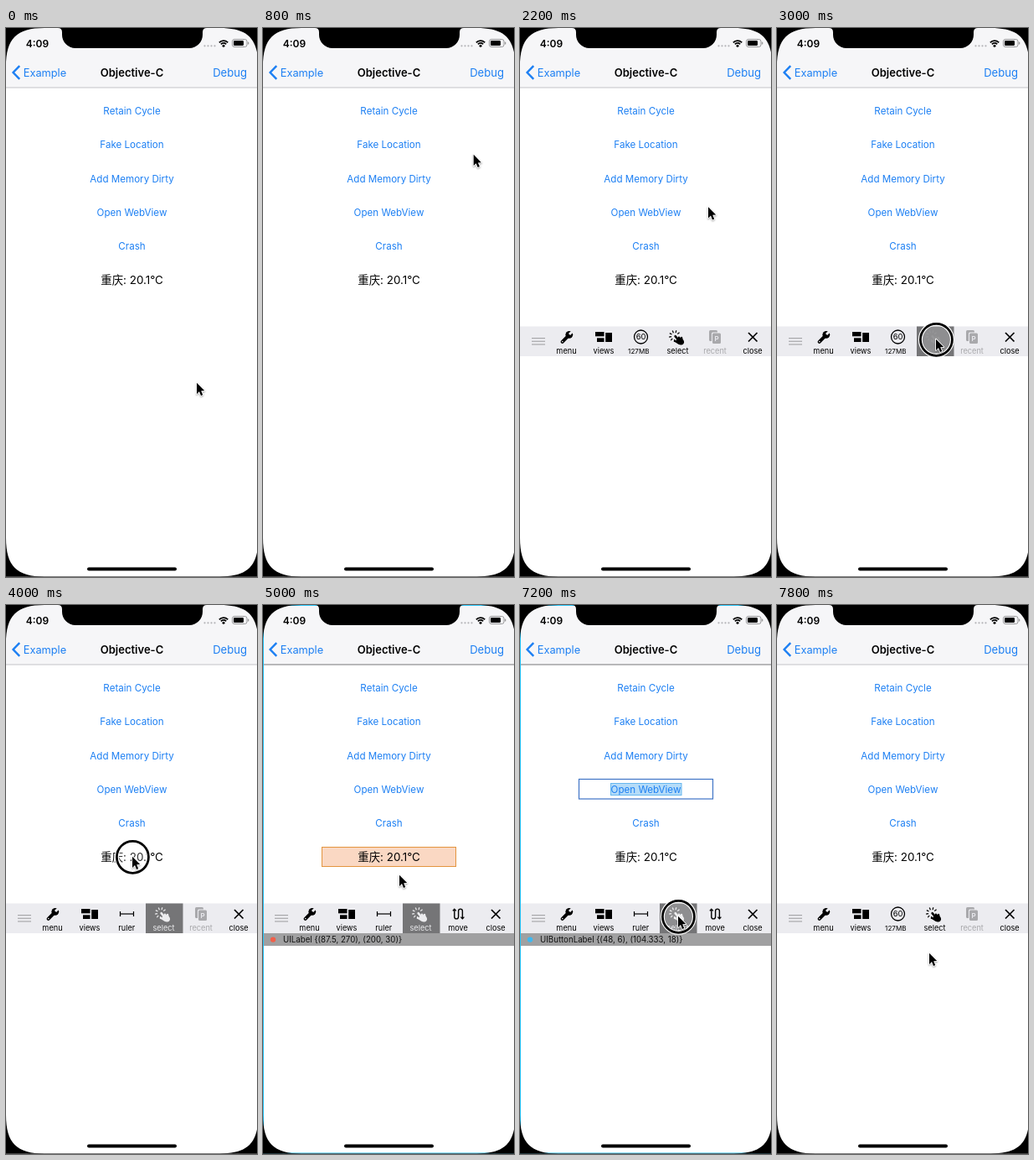
These frames come from a looping animation (300x654 px, 8 s). An HTML page with a canvas:

```html
<!DOCTYPE html>
<html lang="en">
<head>
<meta charset="utf-8">
<title>Debug toolbar demo</title>
<style>
html, body { margin: 0; width: 100%; height: 100%; overflow: hidden; background: #000; }
canvas { display: block; width: 300px; height: 654px; }
</style>
</head>
<body>
<canvas id="stage"></canvas>
<script>
const W = 300, H = 654, LOOP = 8000, STEP = 200;
// The phone screen is slightly wider than the stage
const SW = 301.5, SH = 653.5;
const BLUE = '#1c7ff3', BAR = '#ececf0', GREY = '#a9a9ac', DARK = '#757577';
const FONT = 'Inter, "Noto Sans CJK SC", "Noto Sans CJK", sans-serif';

const canvas = document.getElementById('stage');
const ctx = canvas.getContext('2d');
const dpr = window.devicePixelRatio || 1;
canvas.width = W * dpr;
canvas.height = H * dpr;

// time, x, y of the pointer tip
const path = [
  [0, 228, 422], [1200, 260, 55], [1800, 260, 55], [2600, 190, 370],
  [3200, 190, 370], [3800, 151, 299], [4200, 151, 299], [4800, 163, 321],
  [5000, 163, 321], [5600, 152, 218], [6000, 152, 218], [6600, 200, 392],
  [7000, 189, 370], [7200, 189, 370], [7600, 182, 414], [LOOP, 182, 414]
];
const presses = [[1600, 1800], [2800, 3200], [3800, 4200], [5600, 5800], [7200, 7400]];

const within = (t, a, b) => t >= a && t < b;

function pointer(t) {
  const i = path.findIndex(k => k[0] > t);
  const [t0, x0, y0] = path[i - 1], [t1, x1, y1] = path[i];
  const u = (t - t0) / (t1 - t0), e = u * u * (3 - 2 * u);
  return [x0 + (x1 - x0) * e, y0 + (y1 - y0) * e];
}

// y is the middle of the capital letters
function text(s, x, y, size, color = '#000', align = 'center', weight = 400) {
  ctx.font = `${weight} ${size}px ${FONT}`;
  ctx.textAlign = align;
  ctx.fillStyle = color;
  ctx.fillText(s, x, y + size * 0.364);
}

function rect(x, y, w, h, color) {
  ctx.fillStyle = color;
  ctx.fillRect(x, y, w, h);
}

function round(x, y, w, h, r, color) {
  ctx.beginPath();
  ctx.roundRect(x, y, w, h, r);
  ctx.fillStyle = color;
  ctx.fill();
}

function frame(x, y, w, h, color, width = 1) {
  ctx.strokeStyle = color;
  ctx.lineWidth = width;
  ctx.strokeRect(x, y, w, h);
}

function line(points, color, width, cap = 'butt') {
  ctx.beginPath();
  points.forEach(([x, y]) => ctx.lineTo(x, y));
  ctx.strokeStyle = color;
  ctx.lineWidth = width;
  ctx.lineCap = cap;
  ctx.lineJoin = 'miter';
  ctx.stroke();
}

function arc(x, y, r, color, width, a = 0, b = 7) {
  ctx.beginPath();
  ctx.arc(x, y, r, a, b);
  ctx.strokeStyle = color;
  ctx.lineWidth = width;
  ctx.lineCap = 'butt';
  ctx.stroke();
}

function disc(x, y, r, color) {
  ctx.beginPath();
  ctx.arc(x, y, r, 0, 7);
  ctx.fillStyle = color;
  ctx.fill();
}

function statusBar() {
  text('4:09', 37.5, 18.5, 12, '#000', 'center', 600);
  for (let i = 0; i < 4; i++) disc(237.5 + i * 4, 21.3, 1.1, '#b4b4b8');
  const up = -Math.PI / 2;
  for (const r of [4.3, 7.2]) arc(260, 22.3, r, '#000', 1.8, up - 0.8, up + 0.8);
  disc(260, 21.3, 1.5, '#000');
  ctx.beginPath();
  ctx.roundRect(270.5, 13.5, 17.5, 9, 2.5);
  ctx.strokeStyle = '#8c8c8e';
  ctx.lineWidth = 0.9;
  ctx.stroke();
  round(272, 15, 12, 6, 1.2, '#000');
  round(289, 16.5, 1.3, 3, 0.6, '#999');
}

function navBar(t, picked) {
  rect(0, 0, W, 71, '#f6f6f8');
  rect(0, 70.5, W, 1, picked ? '#77777a' : '#c4c4c8');
  statusBar();
  line([[16.2, 45.2], [8.6, 53], [16.2, 60.8]], BLUE, 2.4);
  text('Example', 20.7, 53, 12.8, BLUE, 'left');
  text('Objective-C', 150.5, 53, 13, '#000', 'center', 600);
  text('Debug', 288, 53, 13.1, within(t, 1600, 1800) ? '#a5cdf8' : BLUE, 'right');
}

function content(target) {
  if (target === 'label') {
    rect(70.5, 288.5, 160, 23, '#fad8c3');
    frame(70.5, 288.5, 160, 23, '#e3953f');
  } else if (target === 'button') {
    frame(70.5, 207.5, 160, 23.5, '#3f74c6', 1.2);
    rect(108.5, 212.5, 84.5, 14, '#b5dcf8');
    frame(108.5, 212.5, 84.5, 14, '#68b8ee');
  }
  ['Retain Cycle', 'Fake Location', 'Add Memory Dirty', 'Open WebView', 'Crash']
    .forEach((s, i) => text(s, 150.5, 99 + i * 40.2, 11.6, BLUE));
  text('重庆: 20.1°C', 150.6, 300.5, 13.4);
}

function wrench() {
  line([[50.6, 373.8], [57.5, 366.8]], '#000', 4, 'round');
  disc(58.8, 365.3, 4.4, '#000');
  line([[59, 365], [63.5, 360.6]], BAR, 3);
  disc(50.8, 373.6, 0.8, BAR);
}

function views() {
  rect(90, 362, 10.5, 5.3, '#000');
  rect(92, 369.3, 8.5, 4.7, '#000');
  rect(102.2, 363, 7.8, 11, '#000');
}

function gauge() {
  arc(144.5, 368, 8, '#000', 1.3);
  text('60', 144.5, 368, 9.4);
}

function ruler() {
  line([[136.5, 368], [152.5, 368]], '#000', 1.2);
  for (const x of [136.5, 152.5]) line([[x, 365], [x, 371]], '#000', 1.2);
}

function hand(color) {
  for (let i = 0; i < 7; i++) {
    const a = (95 + i * 38) * Math.PI / 180;
    const c = Math.cos(a), s = Math.sin(a);
    line([[185 + c * 4, 367 + s * 4], [185 + c * 7, 367 + s * 7]], color, 1.2);
  }
  line([[185.6, 367.2], [190, 372.5]], color, 2.6, 'round');
  line([[190, 368.8], [191.5, 372]], color, 2.6, 'round');
  line([[193, 369], [193.5, 372]], color, 2.4, 'round');
  line([[185, 372.8], [189, 375]], color, 2.2, 'round');
  ctx.beginPath();
  ctx.ellipse(191.3, 373.3, 5, 4, 0.5, 0, 7);
  ctx.fillStyle = color;
  ctx.fill();
}

function recent() {
  round(226, 360, 10, 13, 1.5, GREY);
  round(229, 362.5, 11.5, 14, 1.5, BAR);
  round(230, 363.5, 10, 12.5, 1.5, GREY);
  text('P', 235, 369.7, 8, BAR, 'center', 600);
}

function move() {
  ctx.beginPath();
  ctx.moveTo(228.8, 362.5);
  ctx.lineTo(228.8, 371.5);
  ctx.arc(231.2, 371.5, 2.4, Math.PI, 0, true);
  ctx.lineTo(233.6, 364.5);
  ctx.arc(236, 364.5, 2.4, Math.PI, 0);
  ctx.lineTo(238.4, 373.5);
  ctx.strokeStyle = '#000';
  ctx.lineWidth = 1.4;
  ctx.lineCap = 'butt';
  ctx.stroke();
  line([[226.8, 364.4], [228.8, 362.2], [230.8, 364.4]], '#000', 1.3);
  line([[236.4, 371.6], [238.4, 373.8], [240.4, 371.6]], '#000', 1.3);
}

function toolbar(active, held, picked) {
  rect(0, 355.5, W, 35.5, BAR);
  for (let i = 0; i < 3; i++) rect(14, 369 + i * 3.7, 16, 1.1, '#a2a2a5');
  const caption = (s, x, color, size = 9.2) => text(s, x, 385, size, color);

  wrench();
  caption('menu', 55.5);
  views();
  caption('views', 100);
  if (active) {
    ruler();
    caption('ruler', 144.3);
  } else {
    gauge();
    caption('127MB', 141.8, '#000', 8.1);
  }

  if (active || held) rect(167, 355.5, 44.5, 35.5, DARK);
  const ink = held ? '#808082' : active ? '#ececee' : '#000';
  hand(ink);
  caption('select', 188.5, ink);

  if (picked) {
    move();
    caption('move', 233);
  } else {
    recent();
    caption('recent', 233, GREY);
  }
  line([[273, 363], [283.5, 373.5]], '#000', 1.7);
  line([[283.5, 363], [273, 373.5]], '#000', 1.7);
  caption('close', 278);
}

function info(target) {
  const label = target === 'label';
  rect(0, 391, W, 15, '#a0a0a1');
  disc(12, 398.6, 3.2, label ? '#f0604a' : '#3fb8f0');
  text(label ? 'UILabel {(87.5, 270), (200, 30)}' : 'UIButtonLabel {(48, 6), (104.333, 18)}',
    24, 398.8, 9.7, '#111', 'left');
}

// Smooth corner at (x, y), opening towards (dx, dy)
function corner(x, y, dx, dy) {
  const reach = 46, pull = 12.5;
  ctx.beginPath();
  ctx.moveTo(x, y);
  ctx.lineTo(x, y + dy * reach);
  ctx.bezierCurveTo(x, y + dy * pull, x + dx * pull, y, x + dx * reach, y);
  ctx.fill();
}

function bezel() {
  ctx.fillStyle = '#000';
  corner(0, 0, 1, 1);
  corner(SW, 0, -1, 1);
  corner(0, SH, 1, -1);
  corner(SW, SH, -1, -1);
  ctx.fillRect(0, SH, W, 1);
  ctx.beginPath();
  ctx.moveTo(62, 0);
  ctx.quadraticCurveTo(67, 0, 67, 5);
  ctx.lineTo(67, 8);
  ctx.arcTo(67, 24, 83, 24, 16);
  ctx.lineTo(219, 24);
  ctx.arcTo(235, 24, 235, 8, 16);
  ctx.lineTo(235, 5);
  ctx.quadraticCurveTo(235, 0, 240, 0);
  ctx.fill();
  round(97, 642.5, 107, 4, 2, '#000');
}

function ring(x, y) {
  disc(x, y, 18, 'rgba(255,255,255,.18)');
  arc(x, y, 19, '#fff', 5);
  arc(x, y, 19, '#000', 2.8);
}

function arrow(x, y) {
  ctx.save();
  ctx.translate(x, y);
  ctx.beginPath();
  [[0, 0], [0, 13.2], [3, 10.4], [5, 15.2], [7.2, 14.2], [5.2, 9.6], [9.2, 9.4]]
    .forEach(([px, py]) => ctx.lineTo(px, py));
  ctx.closePath();
  ctx.shadowColor = 'rgba(0,0,0,.35)';
  ctx.shadowBlur = 2 * dpr;
  ctx.shadowOffsetY = dpr;
  ctx.strokeStyle = '#fff';
  ctx.lineWidth = 1.8;
  ctx.lineJoin = 'round';
  ctx.stroke();
  ctx.shadowColor = 'transparent';
  ctx.fillStyle = '#000';
  ctx.fill();
  ctx.restore();
}

function draw(t) {
  const target = within(t, 4200, 5800) ? 'label' : within(t, 5800, 7400) ? 'button' : '';
  ctx.setTransform(dpr, 0, 0, dpr, 0, 0);
  rect(0, 0, W, H, '#fff');
  navBar(t, target);
  content(target);
  if (t >= 1800) toolbar(within(t, 3200, 7400), within(t, 2800, 3200), target);
  if (target) {
    info(target);
    frame(0.5, 0.5, SW - 1, SH - 1, '#27c4f7');
  }
  bezel();
  const [x, y] = pointer(t);
  if (presses.some(([a, b]) => within(t, a, b))) ring(x + 0.4, y + 1.3);
  arrow(x, y + 0.7);
}

function tick() {
  const t = performance.now() % LOOP;
  draw(Math.floor(t / STEP) * STEP);
  requestAnimationFrame(tick);
}
tick();
</script>
</body>
</html>
```
